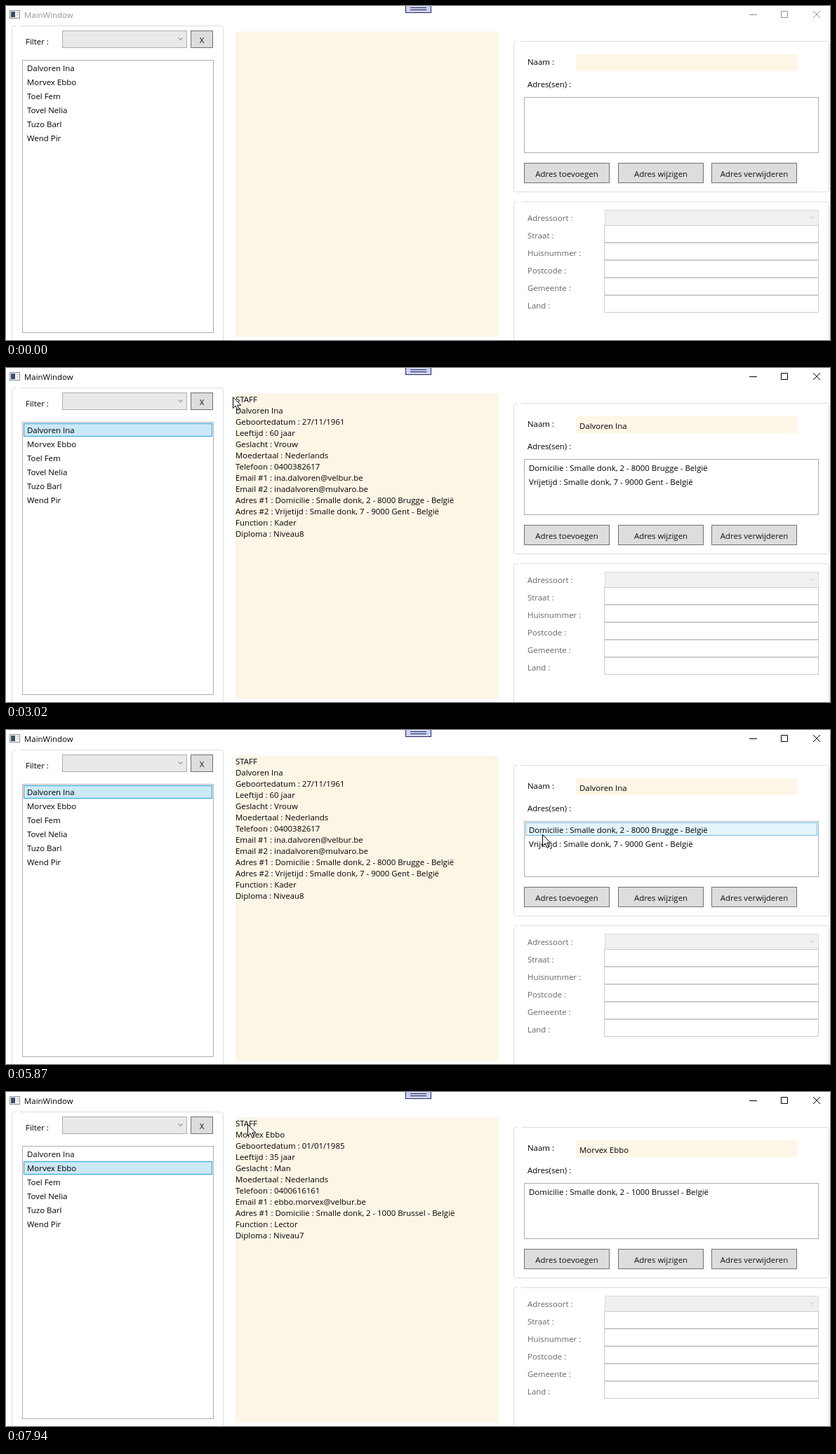
Write an HTML page that moves like this. It is 1174 by 477 pixels and loops after 8000 ms.

```html
<!DOCTYPE html>
<html lang="nl">
<head>
<meta charset="utf-8">
<title>MainWindow</title>
<style>
  html, body { margin: 0; width: 100%; height: 100%; overflow: hidden; background: #fff; }
  svg { display: block; }
  text { font: 11.45px "Open Sans", "Noto Sans", sans-serif; white-space: pre; }
</style>
</head>
<body>
<svg id="stage" width="1174" height="477" viewBox="0 0 1174 477"></svg>
<script>
const LOOP = 8000, TICK = 66.7, FIRST = 985;
const ROW = 20, CREAM = '#fdf5e6', EDGE = '#abadb3';
const HOVER = ['#e4f4fb', '#70c0e7'], CHOSEN = ['#cbe8f6', '#26a0da'];
const stage = document.getElementById('stage');

function add(tag, attrs, parent = stage) {
  const node = document.createElementNS('http://www.w3.org/2000/svg', tag);
  for (const k in attrs) node.setAttribute(k, attrs[k]);
  return parent.appendChild(node);
}
const rect = (x, y, width, height, fill, stroke = 'none', parent) =>
  add('rect', { x, y, width, height, fill, stroke }, parent);
const line = (d, stroke, parent) => add('path', { d, stroke, fill: 'none' }, parent);
function label(x, y, words, fill = '#000', parent, anchor = 'start') {
  add('text', { x, y, fill, 'text-anchor': anchor }, parent).textContent = words;
}
function groupBox(x, y, w, h) {
  rect(x, y, w, h, 'none', '#d5dfe5').setAttribute('rx', 3);
  rect(x + 6, y - 1, 5, 2, '#fff');
}
function button(x, y, w, h, words) {
  rect(x, y, w, h, '#ddd', '#707070');
  label(x + w / 2, y + h / 2 + 5, words, '#111', stage, 'middle');
}
function comboBox(x, y, w, h, fill, stroke, ink) {
  rect(x, y, w, h, fill, stroke);
  line(`M${x + w - 12} ${y + h / 2 - 2}l3 3 3-3`, ink);
}
function listBox(list) {
  rect(list.x, list.y, list.w, list.h, '#fff', EDGE);
}
const highlight = (list, colors) => rect(list.x + 2, list.y + 2, list.w - 4, ROW - 2, ...colors);
function fillList(list, items, parent) {
  items.forEach((s, i) => label(list.x + 6.5, list.base + ROW * i, s, '#000', parent));
}
function show(node, on) { node.style.display = on ? '' : 'none'; }

const people = ['Dalvoren Ina', 'Morvex Ebbo', 'Toel Fem', 'Tovel Nelia', 'Tuzo Barl', 'Wend Pir'];
const details = [
  {
    facts: ['Geboortedatum : 27/11/1961', 'Leeftijd : 60 jaar', 'Geslacht : Vrouw', 'Moedertaal : Nederlands',
      'Telefoon : 0400382617', 'Email #1 : ina.dalvoren@velbur.be', 'Email #2 : inadalvoren@mulvaro.be'],
    addresses: ['Domicilie : Smalle donk, 2 - 8000 Brugge - België', 'Vrijetijd : Smalle donk, 7 - 9000 Gent - België'],
    job: ['Function : Kader', 'Diploma : Niveau8']
  },
  {
    facts: ['Geboortedatum : 01/01/1985', 'Leeftijd : 35 jaar', 'Geslacht : Man', 'Moedertaal : Nederlands',
      'Telefoon : 0400616161', 'Email #1 : ebbo.morvex@velbur.be'],
    addresses: ['Domicilie : Smalle donk, 2 - 1000 Brussel - België'],
    job: ['Function : Lector', 'Diploma : Niveau7']
  }
];
const nameList = { x: 23.5, y: 77.5, w: 272, h: 389, base: 93 };
const addressList = { x: 738.5, y: 130.5, w: 419, h: 79, base: 147 };

// Title bar
rect(5.5, 6.5, 14, 11, '#f4f6f8', '#8a8f96');
rect(7, 8, 6, 8, '#3c5064');
line('M15 9.5h3M15 12.5h3', '#b8bec6');
rect(569.5, -2.5, 36, 12, '#ccd2f5', '#28285a');
line('M576 2.5h23M576 5.5h23', '#22224a');
function titleBar(ink, titleInk) {
  const g = add('g', {});
  label(26, 17, 'MainWindow', titleInk, g);
  line('M1059 12.5h11M1104.5 7.5h9v9h-9zM1150 7l10 10M1160 7l-10 10', ink, g);
  return g;
}
const idleBar = titleBar('#8d8f96', '#8a9a8e');
const activeBar = titleBar('#000', '#000');

// Left column
groupBox(8.5, 28.5, 301, 470);
label(28, 55, 'Filter :');
comboBox(80.5, 35.5, 177, 24, '#e9e9e9', '#acacac', '#606060');
button(263.5, 35.5, 31, 24, 'X');
listBox(nameList);

// Middle and right columns
rect(327, 36.5, 374.5, 436, CREAM);
groupBox(723.5, 50.5, 449, 215);
label(743, 84, 'Naam :');
rect(812, 69, 315, 24, CREAM);
label(743, 116, 'Adres(sen) :');
listBox(addressList);
['toevoegen', 'wijzigen', 'verwijderen'].forEach((verb, i) =>
  button(Math.round(738 + 133.5 * i) + .5, 224.5, 121, 28, 'Adres ' + verb));

groupBox(723.5, 279.5, 449, 220);
comboBox(853.5, 291.5, 304, 22, '#f0f0f0', '#d9d9d9', '#bfbfbf');
['Adressoort', 'Straat', 'Huisnummer', 'Postcode', 'Gemeente', 'Land'].forEach((name, i) => {
  label(743, 307 + 25 * i, name + ' :', '#666');
  if (i) rect(852.5, 288.5 + 25 * i, 305, 24, '#fff', '#cbccd0');
});

// Row highlights lie under the list texts
const hoverName = highlight(nameList, HOVER);
const chosenName = highlight(nameList, CHOSEN);
const hoverAddress = highlight(addressList, HOVER);
fillList(nameList, people);

const panels = details.map(({ facts, addresses, job }, i) => {
  const g = add('g', {});
  const lines = ['STAFF', people[i], ...facts, ...addresses.map((a, n) => `Adres #${n + 1} : ${a}`), ...job];
  lines.forEach((s, n) => label(327, 49 + 16 * n, s, '#000', g));
  label(817, 87, people[i], '#000', g);
  rect(817, 89, 100, 4, CREAM, 'none', g);
  fillList(addressList, addresses, g);
  return g;
});

const glow = add('circle', { r: 12, fill: '#f4ee2a', 'fill-opacity': .8 });
const pointer = add('path', {
  d: 'M.5.5V16.5L4.2 13 7 19.3 9.4 18.3 6.7 12.2H11.8Z', fill: '#fff', stroke: '#000'
});

// Pointer glides from where it rests; bend bows the way down or up
const home = { x: 957, y: 416 };
const glides = [
  { from: 1050, to: 1790, x: 61, y: 84, bend: -130 },
  { from: 2200, to: 2820, x: 350, y: 43 },
  { from: 2820, to: 3010, x: 323, y: 41 },
  { from: 3110, to: 3220, x: 349, y: 41 },
  { from: 3400, to: 3690, x: 353, y: 41 },
  { from: 3990, to: 4650, x: 841, y: 85 },
  { from: 4760, to: 4910, x: 848, y: 79 },
  { from: 5120, to: 5900, x: 764, y: 149, bend: 18 },
  { from: 5921, to: 6140, x: 762, y: 148, bend: 10 },
  { from: 6320, to: 6680, x: 60, y: 111, bend: 8 },
  { from: 7220, to: 7930, x: 344, y: 46 }
];
function pointerAt(t) {
  let { x, y } = home;
  for (const g of glides) {
    if (t <= g.from) break;
    const k = Math.min(1, (t - g.from) / (g.to - g.from));
    const e = 1 - (1 - k) ** 1.4;
    x += (g.x - x) * e;
    y += (g.y - y) * e + (g.bend || 0) * Math.sin(Math.PI * e);
  }
  return [Math.round(x), Math.round(y)];
}
function rowUnder(list, x, y) {
  return x > list.x && x < list.x + list.w ? Math.floor((y - list.y - 1.5) / ROW) : -1;
}
function placeRow(node, row, count) {
  show(node, row >= 0 && row < count);
  node.setAttribute('transform', `translate(0 ${ROW * row})`);
}

const clicks = [2065, 6935];

function draw(t) {
  const chosen = clicks.filter(c => t >= c + 62).length - 1;
  const moving = t >= FIRST;
  const [x, y] = pointerAt(FIRST + Math.floor((t - FIRST) / TICK + 1) * TICK);

  show(idleBar, t < clicks[0]);
  show(activeBar, t >= clicks[0]);
  panels.forEach((p, i) => show(p, i === chosen));

  const nameRow = rowUnder(nameList, x, y);
  placeRow(chosenName, chosen, people.length);
  placeRow(hoverName, nameRow === chosen ? -1 : nameRow, moving ? people.length : 0);
  placeRow(hoverAddress, rowUnder(addressList, x, y), chosen < 0 ? 0 : details[chosen].addresses.length);

  show(glow, clicks.some(c => t >= c && t < c + 135));
  glow.setAttribute('cx', x + .5);
  glow.setAttribute('cy', y + 1);
  show(pointer, moving);
  pointer.setAttribute('transform', `translate(${x} ${y})`);
}

const start = performance.now();
function frame() {
  draw((performance.now() - start) % LOOP);
  requestAnimationFrame(frame);
}
frame();
</script>
</body>
</html>
```
